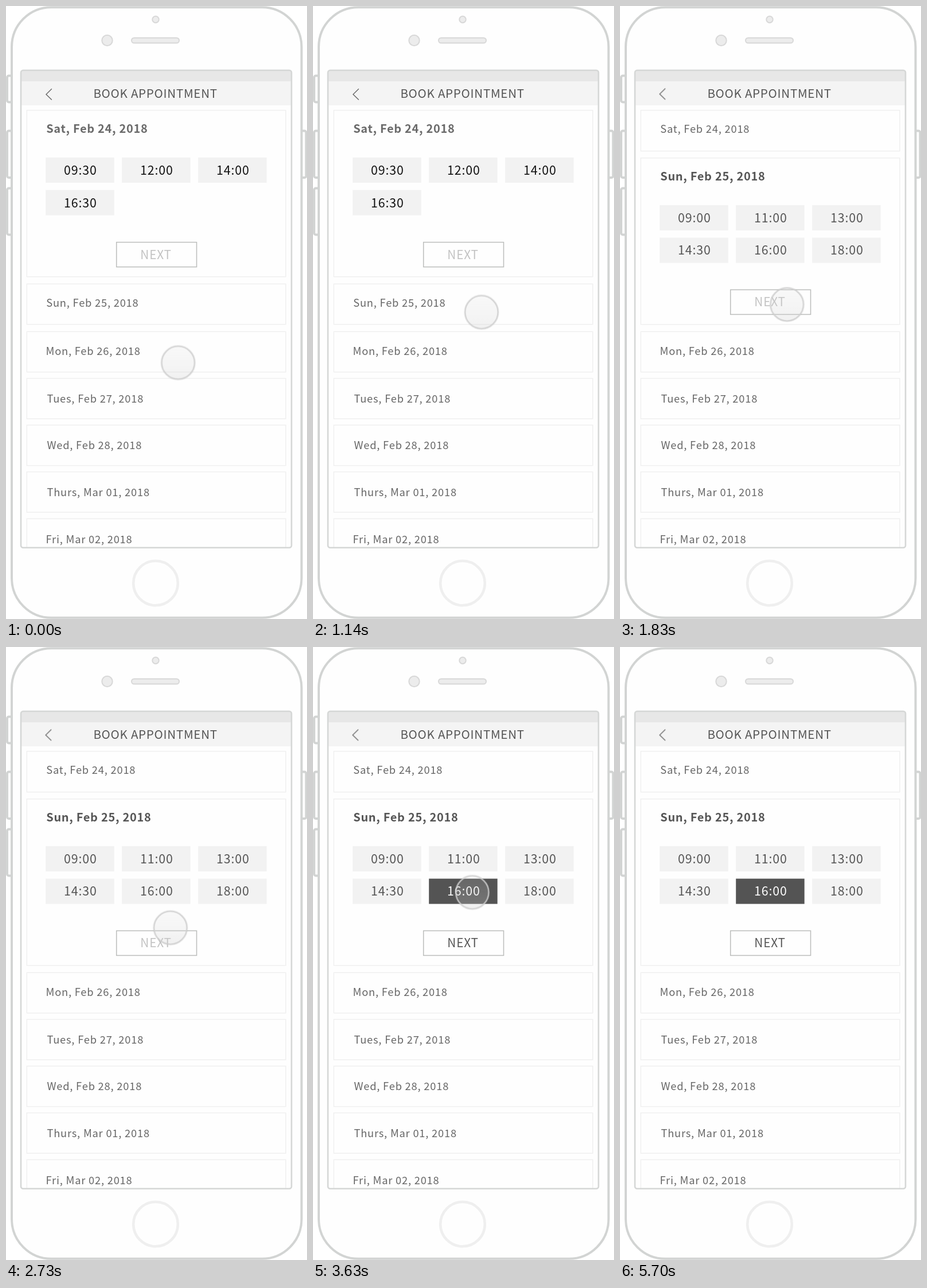
An HTML page for the animation above (5.94 s loop, 525 by 1068 pixels).

```html
<!DOCTYPE html>
<html lang="en">
<head>
<meta charset="utf-8">
<title>Book appointment</title>
<style>
html, body { margin: 0; width: 100%; height: 100%; overflow: hidden; background: #fff; }
svg { display: block; width: 100vw; height: 100vh; }

text {
  font-family: "Noto Sans CJK JP", "Noto Sans CJK SC", "Noto Sans CJK KR", "Noto Sans CJK TC", "Noto Sans", sans-serif;
  fill: #666;
}
.title { font-size: 20.6px; letter-spacing: .7px; fill: #555; }
.date { font-size: 18.3px; letter-spacing: .8px; }
.bold { font-size: 20px; letter-spacing: .7px; font-weight: 600; }
.time { font-size: 21.4px; letter-spacing: .85px; text-anchor: middle; fill: #555; }
.next { font-size: 20.8px; letter-spacing: .8px; text-anchor: middle; fill: #c2c2c2; }
.dark text { fill: #111; }
.dark .next { fill: #c2c2c2; }

.card { fill: #fefefe; stroke: #efefef; stroke-width: 1.4; }
.chip { fill: #f2f2f2; }
.button { fill: #fefefe; stroke: #bbbdbb; stroke-width: 1.5; }
.arrow { fill: none; stroke: #666; stroke-width: 1.4; }
.shell { fill: #fefefe; stroke: #d2d4d3; stroke-width: 4; }
.part { fill: #ececec; stroke: #d8d8d8; stroke-width: 2; }

/* every animation shares one 5940 ms clock */
.before, .after, .sat, .sat-date, .sun, .sun-date, .arrow,
.pick, .pick-text, .ready, .move-x, .move-y, .touch {
  animation: 5940ms linear infinite;
}
.before { animation-name: before; }
.after { animation-name: after; }
.arrow { animation-name: arrow; }
.sat { animation-name: sat; }
.sat-date { animation-name: sat-date; }
.sun { animation-name: sun; }
.sun-date { animation-name: sun-date; }
.pick { animation-name: pick; }
.pick-text { animation-name: pick-text; }
.ready { animation-name: ready; }
.move-x { animation-name: move-x; }
.move-y { animation-name: move-y; }
.touch { animation-name: touch; }

/* accordion: 1455 to 1830 ms */
@keyframes before { 0%, 24.49% { opacity: 1; } 24.495%, 100% { opacity: 0; } }
@keyframes after { 0%, 24.49% { opacity: 0; } 24.495%, 100% { opacity: 1; } }
@keyframes arrow {
  0%, 24.49% { transform: none; }
  24.495%, 100% { transform: translate(-.8px, -.6px); }
}
@keyframes sat {
  0%, 24.495% { height: 290px; animation-timing-function: cubic-bezier(.4, .2, .5, 1); }
  30.808%, 100% { height: 71px; }
}
@keyframes sat-date {
  0%, 24.495% { transform: translate(70.2px, 220.5px) scale(1.16); animation-timing-function: cubic-bezier(.4, .2, .5, 1); }
  30.808%, 100% { transform: translate(70.2px, 220.5px); }
}
@keyframes sun {
  0%, 24.495% { transform: translateY(219.5px); animation-timing-function: cubic-bezier(.4, .2, .5, 1); }
  30.808%, 100% { transform: none; }
}
@keyframes sun-date {
  0%, 24.495% { transform: translate(70.2px, 303.5px) scale(.864); animation-timing-function: cubic-bezier(.4, .2, .5, 1); }
  30.808%, 100% { transform: translate(70.2px, 303.5px); }
}

/* slot chosen: 3315 to 3450 ms */
@keyframes pick { 0%, 55.81% { fill: #f2f2f2; } 58.081%, 100% { fill: #545454; } }
@keyframes pick-text { 0%, 55.81% { fill: #555; } 58.081%, 100% { fill: #fff; } }
@keyframes ready { 0%, 55.81% { fill: #c2c2c2; } 58.081%, 100% { fill: #555; } }

/* touch point: 780-1350, 2460-3150 and 5370-5640 ms */
@keyframes move-x {
  0%, 13.131% { transform: translateX(300.2px); animation-timing-function: cubic-bezier(.37, 0, .63, 1); }
  22.727%, 41.414% { transform: translateX(291.3px); animation-timing-function: cubic-bezier(.37, 0, .63, 1); }
  53.03%, 90.404% { transform: translateX(277.8px); animation-timing-function: cubic-bezier(.37, 0, .63, 1); }
  94.949%, 100% { transform: translateX(469px); }
}
@keyframes move-y {
  0%, 13.131% { transform: translateY(621.5px); animation-timing-function: cubic-bezier(.42, 0, .3, 1); }
  22.727%, 41.414% { transform: translateY(520px); animation-timing-function: cubic-bezier(.37, 0, .63, 1); }
  53.03%, 90.404% { transform: translateY(427.5px); animation-timing-function: cubic-bezier(.37, 0, .63, 1); }
  94.949%, 100% { transform: translateY(331px); }
}
@keyframes touch { 0%, 91.5% { opacity: 1; } 94.949%, 100% { opacity: 0; } }
</style>
</head>
<body>
<svg viewBox="0 0 525 1068" preserveAspectRatio="none">
  <defs>
    <clipPath id="screen"><rect x="27" y="112" width="470" height="831"/></clipPath>
    <clipPath id="fold"><rect x="30" y="170" width="465" height="385.6"/></clipPath>
    <linearGradient id="glass" x1="0" y1="0" x2="0" y2="1">
      <stop offset="0" stop-color="#d8d8d8" stop-opacity=".14"/>
      <stop offset="1" stop-color="#d0d0d0" stop-opacity=".28"/>
    </linearGradient>
    <rect id="chip" width="119.5" height="44"/>
    <rect id="button" x="192.7" width="139.8" height="43"/>
    <rect id="row" x="36.3" width="451.6" height="70.4"/>
  </defs>

  <!-- phone -->
  <g class="shell">
    <rect x="2" y="121.5" width="12" height="46" rx="3"/>
    <rect x="2" y="217.5" width="12" height="81.5" rx="3"/>
    <rect x="2" y="317.5" width="12" height="81" rx="3"/>
    <rect x="511" y="217.5" width="12.5" height="81.5" rx="3"/>
    <rect x="10" y="2.2" width="505.5" height="1063.6" rx="69"/>
  </g>
  <g class="part">
    <circle cx="261" cy="23.5" r="5.7"/>
    <circle cx="176.5" cy="60" r="9.2"/>
    <rect x="219" y="55.5" width="83" height="9" rx="4.5"/>
  </g>
  <circle cx="261" cy="1005.5" r="38.8" fill="#fefefe" stroke="#efefef" stroke-width="4.6"/>

  <g clip-path="url(#screen)">
    <rect x="26" y="112" width="472" height="19.5" fill="#e7e7e7"/>
    <rect x="26" y="131.5" width="472" height="41.5" fill="#f4f4f4"/>
    <path class="arrow" d="M79.8 144.3 70 153.9l9.8 9.6"/>
    <text class="title" x="152.4" y="159.5">BOOK APPOINTMENT</text>

    <!-- Saturday -->
    <rect class="card sat" x="36.3" y="181.7" width="451.6" height="290"/>
    <g class="before dark">
      <text class="bold" x="70.2" y="220.5" style="fill:#6a6a6a">Sat, Feb 24, 2018</text>
      <use href="#chip" class="chip" x="69.2" y="264"/>
      <use href="#chip" class="chip" x="202.2" y="264"/>
      <use href="#chip" class="chip" x="335.2" y="264"/>
      <use href="#chip" class="chip" x="69.2" y="320.6"/>
      <text class="time" x="129.8" y="294">09:30</text>
      <text class="time" x="262.8" y="294">12:00</text>
      <text class="time" x="395.8" y="294">14:00</text>
      <text class="time" x="129.8" y="350.5">16:30</text>
      <use href="#button" class="button" y="411.6"/>
      <text class="next" x="261.5" y="440.5">NEXT</text>
      <use href="#row" class="card" y="484.3"/>
      <text class="date" x="70.2" y="524" style="fill:#666">Sun, Feb 25, 2018</text>
    </g>

    <!-- Sunday, unfolded -->
    <g class="after">
      <text class="date sat-date">Sat, Feb 24, 2018</text>
      <g clip-path="url(#fold)">
        <g class="sun">
          <rect class="card" x="36.3" y="264.8" width="451.6" height="290"/>
          <text class="bold sun-date" style="fill:#555">Sun, Feb 25, 2018</text>
          <use href="#chip" class="chip" x="69.2" y="347"/>
          <use href="#chip" class="chip" x="202.2" y="347"/>
          <use href="#chip" class="chip" x="335.2" y="347"/>
          <use href="#chip" class="chip" x="69.2" y="403.6"/>
          <use href="#chip" class="chip pick" x="202.2" y="403.6"/>
          <use href="#chip" class="chip" x="335.2" y="403.6"/>
          <text class="time" x="129.8" y="376.7">09:00</text>
          <text class="time" x="262.8" y="376.7">11:00</text>
          <text class="time" x="395.8" y="376.7">13:00</text>
          <text class="time" x="129.8" y="433.3">14:30</text>
          <text class="time pick-text" x="262.8" y="433.3">16:00</text>
          <text class="time" x="395.8" y="433.3">18:00</text>
          <use href="#button" class="button" y="494.4"/>
          <text class="next ready" x="261.5" y="523.3">NEXT</text>
        </g>
      </g>
    </g>

    <!-- other days -->
    <g class="card">
      <use href="#row" y="567.3"/>
      <use href="#row" y="648.8"/>
      <use href="#row" y="730.2"/>
      <use href="#row" y="811.7"/>
      <use href="#row" y="893.2"/>
    </g>
    <g class="date" stroke="none">
      <text x="69.5" y="608">Mon, Feb 26, 2018</text>
      <text x="71.4" y="691">Tues, Feb 27, 2018</text>
      <text x="71.4" y="772.3">Wed, Feb 28, 2018</text>
      <text x="71.4" y="854">Thurs, Mar 01, 2018</text>
      <text x="69.5" y="935.5">Fri, Mar 02, 2018</text>
    </g>
  </g>
  <rect x="26" y="112" width="472" height="831.7" rx="4" fill="none" stroke="#d5d7d6" stroke-width="2.6"/>

  <!-- touch point -->
  <g class="move-x"><g class="move-y"><g class="touch">
    <circle r="29.6" fill="none" stroke="#999" stroke-opacity=".14" stroke-width="2.6"/>
    <circle r="28.6" fill="url(#glass)" stroke="#cfcfcf" stroke-opacity=".85" stroke-width="2.4"/>
  </g></g></g>
</svg>
</body>
</html>
```
